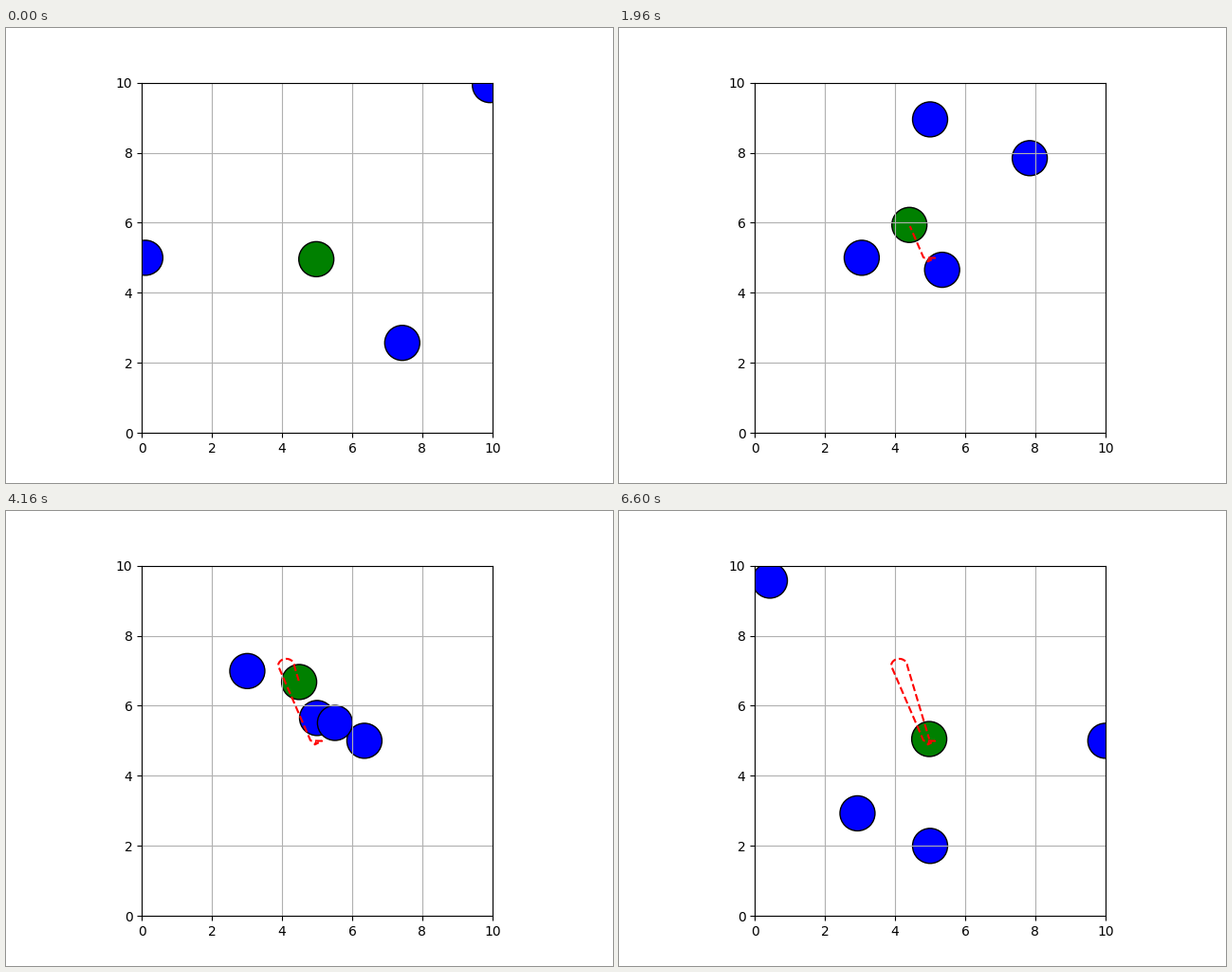
A matplotlib script that plays this animation: 640x480 px, repeating every 6.64 s.

```python
import numpy as np
import matplotlib.pyplot as plt
from matplotlib.animation import FuncAnimation
from matplotlib.patches import Circle

LOOP_MS = 6640
TICK_MS = 20
STEPS = 199            # simulation steps, shown at 30 per second
RADIUS = 0.5
OBSTACLE_SPEED = 0.05  # units per step
ROBOT_SPEED = 0.0374
DODGE_STEP = 23        # the robot rests until it has to dodge

# Obstacles: start x, start y, heading in degrees
OBSTACLES = [(5, 12, -90), (0, 5, 0), (10, 10, -135), (7.5, 2.5, 135)]


def along(path, dist):
    """Points at the given distances along a polyline."""
    legs = np.hypot(*np.diff(path, axis=0).T)
    length = np.concatenate([[0], np.cumsum(legs)])
    return np.column_stack([np.interp(dist, length, c) for c in path.T])


def robot_track():
    """Small wobble near the goal, then out, around a half ellipse and back."""
    steps = np.arange(STEPS)
    wobble = np.array([(4.978, 4.96), (4.92, 4.885), (5.14, 4.995)])
    turn = np.linspace(np.pi, 0, 30)
    bend = np.column_stack([4.12 + 0.23 * np.cos(turn), 7.14 + 0.2 * np.sin(turn)])
    detour = np.vstack([wobble[-1], (4.815, 5.0), bend, (4.975, 5.05)])
    early = along(wobble, ROBOT_SPEED * steps[:DODGE_STEP])
    late = along(detour, ROBOT_SPEED * (steps[DODGE_STEP:] - DODGE_STEP))
    return np.vstack([early, late])


def obstacle_pos(x, y, heading, step):
    angle = np.radians(heading)
    dist = OBSTACLE_SPEED * (step + 2)
    return x + dist * np.cos(angle), y + dist * np.sin(angle)


fig = plt.figure(figsize=(6.4, 4.8), dpi=100)
ax = fig.add_subplot(111, autoscale_on=False, xlim=(0, 10), ylim=(0, 10))
ax.set_aspect("equal")
ax.grid()


def add_disc(color):
    return ax.add_patch(Circle((0, 0), RADIUS, facecolor=color, edgecolor="black"))


track = robot_track()
robot = add_disc("green")
discs = [add_disc("blue") for _ in OBSTACLES]
trail, = ax.plot([], [], "--r")


def update(frame):
    # Steps start at multiples of 100/3 ms, rounded down to 10 ms
    step = min((3 * frame * TICK_MS + 29) // 100, STEPS - 1)
    robot.center = track[step]
    for disc, path in zip(discs, OBSTACLES):
        disc.center = obstacle_pos(*path, step)
    trail.set_data(*track[:step].T)
    return [robot, *discs, trail]


anim = FuncAnimation(fig, update, frames=LOOP_MS // TICK_MS, interval=TICK_MS,
                     init_func=lambda: update(0), repeat=True, repeat_delay=0)
plt.show()
```
